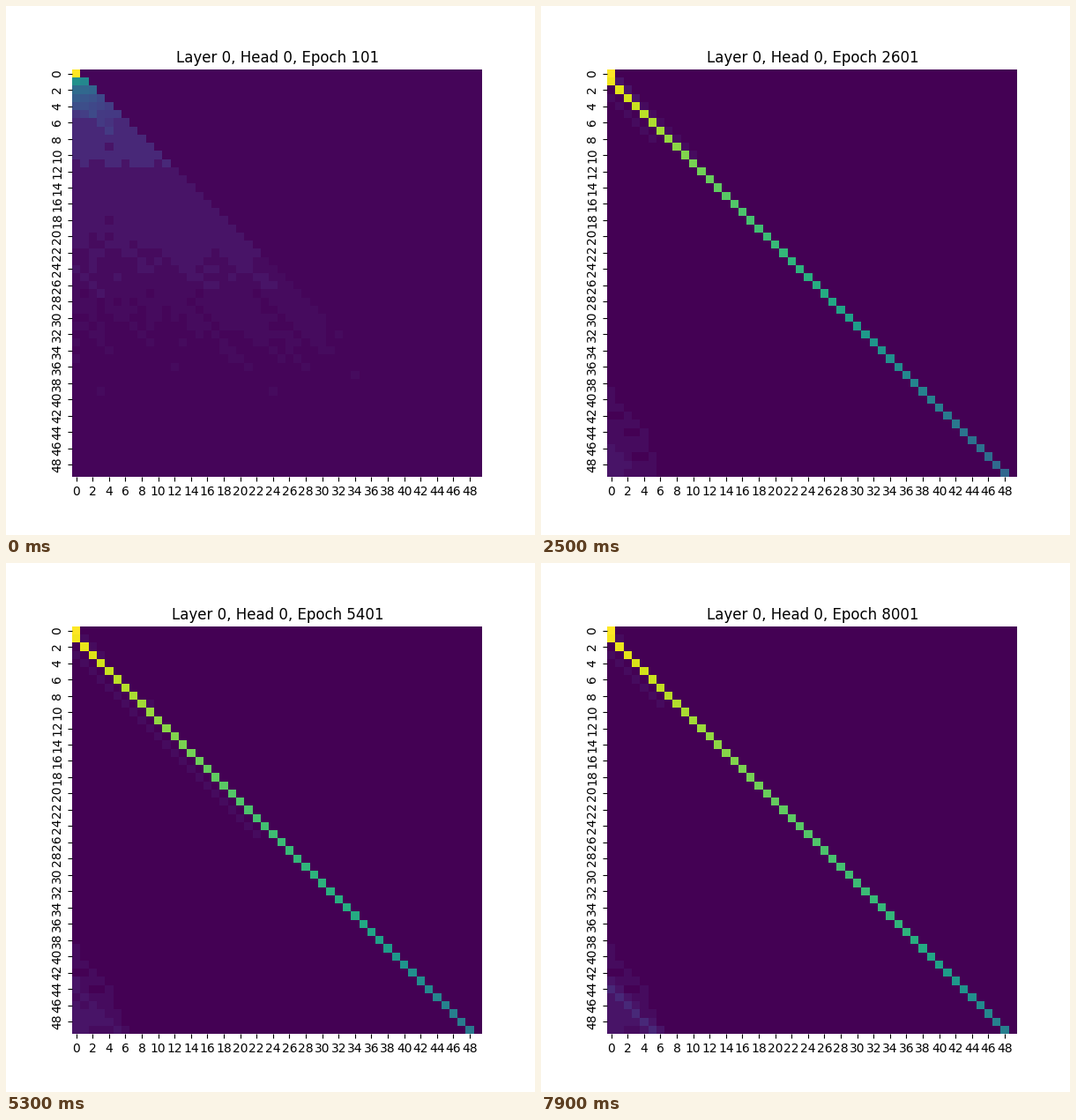
Animation, 600 px wide and 600 px high, one loop 8 s. Source, as a matplotlib script:

```python
import numpy as np
import matplotlib.pyplot as plt
from matplotlib.animation import FuncAnimation

N = 50
FRAMES = 80
LEARNED = 16  # step at which the head has found the previous token
I, J = np.indices((N, N))
OFF = I - J
ROWS = np.arange(N)
COUNT = np.maximum(ROWS, 1)


def make_noise(seed):
    """Cell noise plus streaks along the diagonals."""
    rng = np.random.default_rng(seed)
    cell = rng.normal(0, .065, (N, N))
    diag = rng.normal(0, .075, 2 * N)
    return cell + diag[OFF + N]


NOISE = make_noise(3), make_noise(8)
GRAIN = np.random.default_rng(5).normal(0, .0025, (N, N))


def ramp(k, start, end):
    return np.clip((k - start) / (end - start), 0, 1)


def prev_weight(k):
    """Attention of each row to the token before it."""
    steps = [LEARNED, 34, 79]
    w = np.interp(k, steps, [40, 46, 68])
    knee = np.interp(k, steps, [20, 34, 37])
    slope = np.interp(k, steps, [.011, .015, .022])
    s = w / (w + COUNT) * (1 - slope * np.maximum(ROWS - knee, 0))
    grow = min(k / LEARNED, 1) ** 4.4
    odds = (s / (1 - s) * COUNT) ** grow
    return odds / (odds + COUNT)


def add_corner(v, k):
    """Long-range glow at the lower left, with a ridge that grows."""
    far = (OFF >= 38) & (J <= 7)
    glow = .028 + .0016 * (OFF - 38) - .0008 * J + GRAIN
    glow += .065 * ramp(k, 34, 79) * np.exp(-1.5 * (OFF - 44) ** 2)
    v[far] = np.maximum(v, glow * ramp(k, LEARNED, 18))[far]


def add_tail(v, k):
    """Faint third diagonal that reaches down and draws back."""
    end = 8 + 18 * np.exp(-((k - 55) / 15) ** 2)
    tail = (OFF == 3) & (I <= end)
    v[tail] = np.maximum(v[tail], .033)


def banded(v, zero):
    """Merge the faintest values into a few flat levels."""
    return np.select([v < .0305, v < .0417, v < .086, v < .145],
                     [zero, .03, .052, .11], v)


def attention(k):
    s = prev_weight(k)
    mix = ramp(k, 0, 11)
    noise = NOISE[0] * (1 - mix) + NOISE[1] * mix
    streak = np.interp(k, [9, 11, LEARNED, 18], [0, .42, .97, 0])
    boost = np.where(OFF == 31, streak, 0)
    boost += np.isin(OFF, [39, 42]) * streak ** 3
    boost += (OFF == 0) * ramp(k, 11, LEARNED) * np.maximum(.8 - .03 * I, 0)
    v = ((1 - s) / COUNT)[:, None] * np.exp(noise + boost)

    if k > LEARNED:
        add_tail(v, k)
        add_corner(v, k)

    v[OFF == 1] = s[1:]
    v[OFF < 0] = 0
    v[0, 0] = 1
    return banded(v, .012 * (1 - ramp(k, 0, LEARNED) ** 4))


fig, ax = plt.subplots(figsize=(6, 6), dpi=100)
fig.subplots_adjust(left=.125, right=.9, bottom=.11, top=.88)
mesh = ax.pcolormesh(attention(0), cmap="viridis", vmin=0, vmax=1)
ax.set(xlim=(0, N), ylim=(N, 0))
ticks = np.arange(0, N, 2)
ax.set_xticks(ticks + .5, ticks)
ax.set_yticks(ticks + .5, ticks, rotation="vertical", va="center")
ax.spines[:].set_visible(False)
title = ax.set_title("", x=.501)


def update(k):
    mesh.set_array(attention(k))
    title.set_text(f"Layer 0, Head 0, Epoch {101 + 100 * k}")
    return mesh, title


anim = FuncAnimation(fig, update, frames=FRAMES, interval=100, repeat=True,
                     repeat_delay=0)
plt.show()
```
